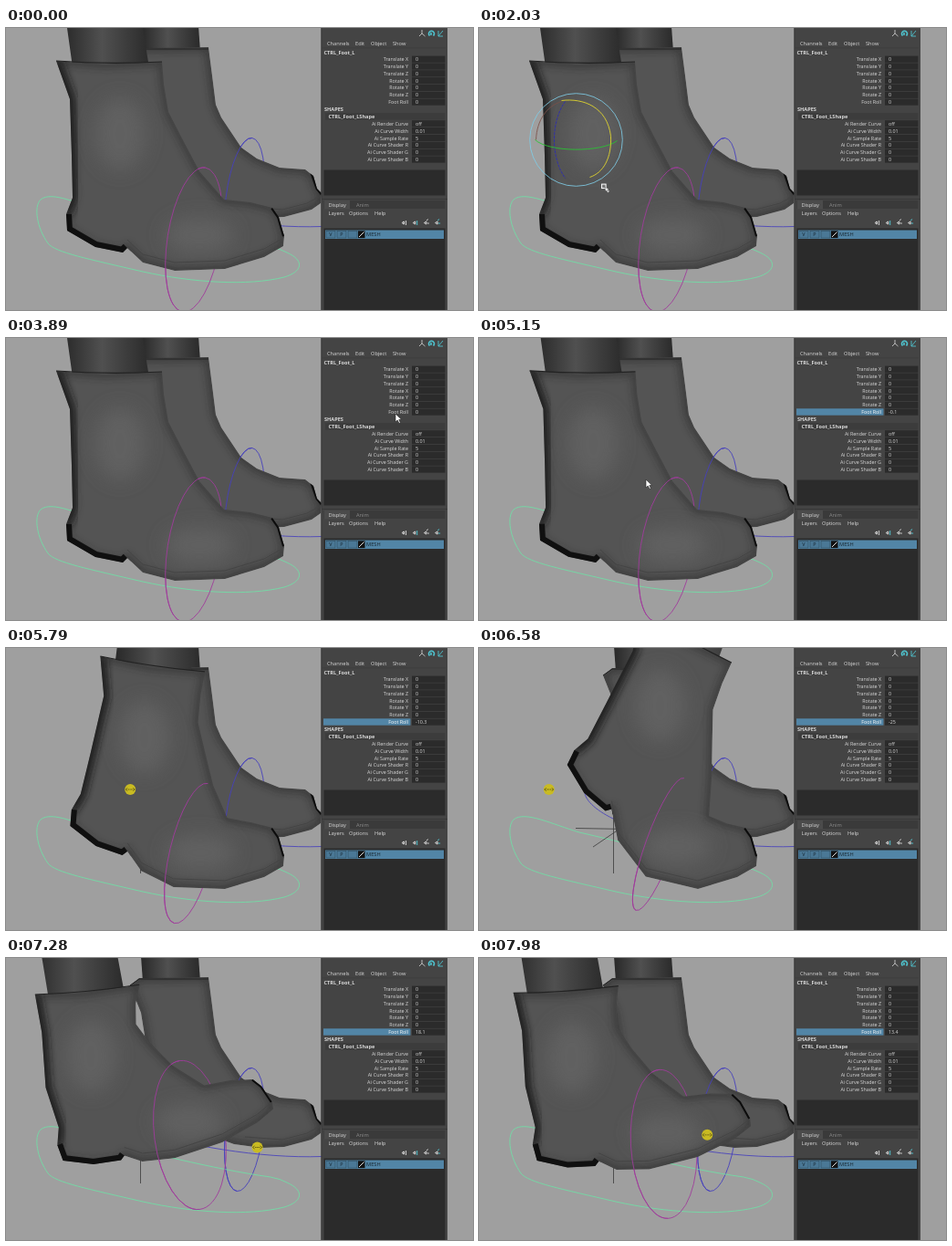
Animation, 512 px wide and 309 px high, one loop 8000 ms. Source, as an HTML page:

```html
<!DOCTYPE html>
<html lang="en">
<head>
<meta charset="utf-8">
<title>Foot roll rig</title>
<style>
  html, body { margin: 0; width: 100%; height: 100%; overflow: hidden; background: #9f9f9f; }
  svg { display: block; }
  text { font: 5.35px "Open Sans", "Noto Sans", sans-serif; fill: #dadada; }
  .bold { font-size: 5.6px; font-weight: 700; }
  .menu { font-size: 5.7px; }
  .end { text-anchor: end; }
  .line { fill: none; }
  .curve { fill: none; stroke-width: .85; }
</style>
</head>
<body>
<svg width="512" height="309" viewBox="0 0 512 309">
  <defs>
    <filter id="soft" x="-30%" y="-30%" width="160%" height="160%"><feGaussianBlur stdDeviation="4"/></filter>
    <filter id="glow" x="-60%" y="-60%" width="220%" height="220%"><feGaussianBlur stdDeviation="10"/></filter>
    <linearGradient id="leg"><stop stop-color="#282828"/><stop offset=".45" stop-color="#505050"/><stop offset="1" stop-color="#2a2a2a"/></linearGradient>
    <clipPath id="farClip"><path id="farClipPath"/></clipPath>
    <clipPath id="nearClip"><path id="nearClipPath"/></clipPath>
  </defs>
  <rect width="512" height="309" fill="#9f9f9f"/>

  <g class="curve" stroke="#4640bc">
    <path d="M150 143C104 142 106 167 147 187C190 205 280 220 346 217.500"/>
    <ellipse rx="20.500" ry="68" transform="translate(261.500 188) rotate(7)"/>
  </g>
  <path fill="url(#leg)" d="M148-2H211L213 26H150Z"/>
  <g clip-path="url(#farClip)">
    <path id="far" fill="#545454"/>
    <path id="farEdge" class="line" stroke="#222" stroke-width="8" opacity=".55" filter="url(#soft)"/>
    <path class="line" stroke="#0c0c0c" stroke-width="3" d="M335 159L341 176 346 182"/>
    <path class="line" stroke="#444" d="M345 184L330 192 303 199 262 196"/>
  </g>
  <path class="line" stroke="#222" d="M136 30L146 23H222"/>
  <path class="curve" stroke="#4640bc" transform="translate(261.500 188) rotate(7)" d="M0-68A20.500 68 0 0 0 0 68"/>

  <path class="curve" stroke="#70dfa6" d="M290 240C225 231 150 211 110 202C80 193 50 178 38 188C30 196 34 219 46 236C54 246 90 253 150 267C205 279 265 283 305 273C325 267 328 255 308 246Q301 242 290 240"/>
  <path class="line" stroke="#3a3a3a" stroke-width=".8" d="M106 197.500L190 199M147.500 150V247M125 218L175 184"/>
  <ellipse id="ring" class="curve" stroke="#a03c9c"/>
  <path id="shin" fill="url(#leg)"/>
  <g clip-path="url(#nearClip)">
    <path id="near" fill="#545454"/>
    <ellipse id="shaftLight" rx="28" ry="40" fill="#606060" filter="url(#glow)"/>
    <ellipse id="vampLight" rx="38" ry="20" fill="#606060" filter="url(#glow)"/>
    <path id="nearEdge" class="line" stroke="#222" stroke-width="8" opacity=".5" filter="url(#soft)"/>
    <path id="backShade" class="line" stroke="#1c1c1c" stroke-width="10" filter="url(#soft)"/>
    <path id="welt" class="line" stroke="#444"/>
    <path id="heel" class="line" stroke="#101010" stroke-width="12"/>
    <path id="toe" class="line" stroke="#0c0c0c" stroke-width="4"/>
  </g>
  <path id="rim" class="line" stroke="#222" stroke-width="1.200"/>
  <path id="ringFront" class="curve" stroke="#a03c9c"/>

  <g id="gizmo" class="curve" transform="translate(106.500 122.500)">
    <path stroke="#7b5148" d="M-44 0C-43-22-32-37-16-42"/>
    <path stroke="#2a2ab8" d="M-12-42C-28-20-28 20-12 42" stroke-dasharray="3 1"/>
    <path stroke="#27c832" d="M-45 0C-30 14 28 14 45 1"/>
    <path id="hotRing" d="M-16-43C8-46 34-36 38-4C39 20 30 36 15 41"/>
    <circle r="50.800" stroke="#7fcbe6"/>
  </g>

  <g id="panel"></g>

  <path id="arrow" fill="#fff" stroke="#222" stroke-width=".6" d="M0 0V9L2.200 7 4 10.500 5.400 9.800 3.800 6.500 6.500 6.300Z"/>
  <g id="pick">
    <path stroke="#fff" stroke-width="2" d="M4 4L8 9"/>
    <rect x=".5" y=".5" width="4.500" height="4.500" fill="#777" stroke="#fff"/>
    <path fill="#fff" stroke="#222" stroke-width=".4" d="M4 4L8.500 6 6.500 6.800 8.500 9 7.500 9.800 5.800 7.500 4.800 9Z"/>
  </g>
  <g id="drag">
    <circle r="6" fill="#c9bb22"/>
    <path class="line" stroke="#6a6214" d="M-3-1.500L-5 0-3 1.500M3-1.500L5 0 3 1.500M-2.500 0H-1M-.5 0H.5M1 0H2.500"/>
  </g>
</svg>
<script>
const LOOP = 8000, REFRESH = 78, PHASE = 18;
const $ = id => document.getElementById(id);
const set = (node, attrs) => { for (const k in attrs) node.setAttribute(k, attrs[k]); return node; };
const setAll = (ids, attrs) => ids.split(' ').forEach(id => set($(id), attrs));
const show = (node, on) => { node.style.display = on ? '' : 'none'; };
const clamp = (v, lo, hi) => Math.min(hi, Math.max(lo, v));
const mix = (a, b, k) => a.map((v, i) => v + (b[i] - v) * k);

// Channel box and layer editor
const DARK = '#2b2b2b', BLUE = '#5285a6', TEAL = '#4fc3cf';
const add = (tag, attrs, text) => {
  const node = set(document.createElementNS('http://www.w3.org/2000/svg', tag), attrs);
  if (text !== undefined) node.textContent = text;
  return $('panel').appendChild(node);
};
const box = (x, y, width, height, fill) => add('rect', { x, y, width, height, fill });
const label = (x, y, text, cls = '', fill = '') =>
  add('text', { x, y: y + 2, class: cls, style: fill && `fill:${fill}` }, text);
const stroke = (d, color, width = 1) => add('path', { d, fill: 'none', stroke: color, 'stroke-width': width });
function row(name, value, y) {
  box(445, y - 3.6, 36.5, 7.2, DARK);
  return { name: label(441, y, name, 'end'), value: label(449, y, value) };
}

box(345.5, 0, 138.5, 309, '#444');
box(345.5, 0, 1, 309, '#383838');
stroke('M456 2V6L453 9M456 6L459.500 9', '#bbb');
stroke('M464.500 8.500A3 3 0 1 1 468.500 8.500M466 5V8', TEAL, 1.6);
stroke('M474 9L479 3M474 3V9H479', TEAL, .9);
[['Channels', 352], ['Edit', 383], ['Object', 400], ['Show', 424]].forEach(([s, x]) => label(x, 16.5, s, 'menu'));
box(347, 21.5, 135, .7, '#3a3a3a');
label(348.5, 26.5, 'CTRL_Foot_L', 'bold');

const hilite = box(348, 77.3, 95.5, 7.4, BLUE);
['Translate', 'Rotate'].forEach((kind, k) => [...'XYZ'].forEach((axis, i) =>
  row(`${kind} ${axis}`, '0', 34.2 + (3 * k + i) * 7.82)));
const rollRow = row('Foot Roll', '0', 81.1);
label(349, 89, 'SHAPES', 'bold');
box(350, 93.2, 131.5, 7.4, '#3c3c3c');
label(353.5, 97, 'CTRL_Foot_LShape', 'bold');
[['Render Curve', 'off'], ['Curve Width', '0.01'], ['Sample Rate', '5'],
  ['Curve Shader R', '0'], ['Curve Shader G', '0'], ['Curve Shader B', '0']]
  .forEach(([name, value], i) => row('Ai ' + name, value, 104.8 + i * 7.85));

box(348.5, 155.5, 133, 28, DARK);
box(346, 187, 138, 1, '#383838');
box(348.5, 189, 133, 9, '#3a3a3a');
box(349, 189, 28, 9.5, '#4b4b4b');
label(353.5, 194, 'Display', 'menu');
label(384, 194, 'Anim', 'menu', '#8c8c8c');
[['Layers', 353.5], ['Options', 376], ['Help', 404]].forEach(([s, x]) => label(x, 203, s, 'menu'));
for (let i = 0; i < 4; i++) {
  const x = 436.5 + i * 12.2;
  stroke(`M${x - 2.5} 213.500L${x} 212V215Z`, '#ddd');
  stroke(i < 2 ? `M${x + 2} 211V216` : `M${x} 211L${x + 2} 209.500M${x + 1} 214H${x + 3}`, i % 2 ? TEAL : '#ccc');
}
box(348.5, 219.5, 133, 89.5, DARK);
box(350, 221.5, 130, 9.5, BLUE);
['V', 'P', ''].forEach((s, i) => {
  const x = 351 + 12 * i;
  set(box(x, 222.5, 10, 7.5, '#4a7896'), { stroke: '#2d4a5c', 'stroke-width': .6 });
  label(x + 3.2, 226.3, s, '', '#16232c');
});
box(386, 222.3, 7.5, 7.8, '#111');
stroke('M387 229L392.500 223.500', '#ddd');
label(395, 226.3, 'MESH', 'menu', '#17252e');

// Near boot at rest: outline clockwise from the back of the collar
const points = s => s.split(' ').map(p => p.split(',').map(Number));
const BOOT = points('55,36 110,40 171,37 173,62 178,92 194,123 212,157 239,188 268,191 292,197 299,207 305,228 ' +
  '304,239 283,251 240,264 185,266 150,257 133,241 128,246 98,240 67,222 66,204 73,186 72,140 70,78');
const SHIN = points('62,-60 144,-60 150,0 158,50 74,50 67,0');
const TOE_PIVOT = [265, 233], HEEL_PIVOT = [67, 222];

function turn([x, y], [cx, cy], deg) {
  const a = deg * Math.PI / 180, c = Math.cos(a), s = Math.sin(a);
  return [cx + (x - cx) * c - (y - cy) * s, cy + (x - cx) * s + (y - cy) * c];
}

// Negative roll lifts the heel about the toe; positive roll lifts the toe about the heel.
function bend([x, y], roll) {
  if (roll < 0) {
    const weight = clamp((290 - x - .9 * (y - 190)) / 100, 0, 1);
    const lean = .13 * Math.sin(-Math.PI * roll / 25) * Math.max(0, 190 - y);
    const [tx, ty] = mix([x, y], turn([x, y], TOE_PIVOT, -.5 * roll + .026 * roll * roll), weight);
    return [tx + lean, ty];
  }
  const weight = clamp((y + 10) / 140, .35, 1);
  const flat = [x, y - Math.max(0, y - 222) * .014 * roll];
  const [tx, ty] = mix(flat, turn(flat, HEEL_PIVOT, -.93 * roll), weight);
  return [tx - .25 * roll, ty];
}

const path = pts => 'M' + pts.map(p => p.map(v => v.toFixed(1)).join(' ')).join('L');

setAll('far farEdge farClipPath', {
  d: `M136 30L146 22 222 21 226 52 230 84 236 98 246 113 258 131 275 143 300 153 328 155 337 162 341 176 346 181
    345 192 335 199 305 207 280 208 250 204 225 195 170 190 156 110 148 60Z`
});

function drawBoot(roll) {
  const b = BOOT.map(p => bend(p, roll));
  const between = (i, j) => { const [cx, cy] = mix(b[i], b[j], .5); return { cx, cy }; };
  setAll('near nearEdge nearClipPath', { d: path(b) + 'Z' });
  set($('shin'), { d: path(SHIN.map(p => bend(p, roll))) + 'Z' });
  set($('shaftLight'), between(4, 23));
  set($('vampLight'), between(7, 15));
  set($('welt'), { d: path(b.slice(11, 18).map(([x, y]) => [x, y - 9])) });
  set($('heel'), { d: path(b.slice(17, 22)) });
  set($('toe'), { d: path(b.slice(9, 12)) });
  set($('backShade'), { d: path([...b.slice(21), b[0]]) });
  set($('rim'), { d: `M${b[0]}Q${b[1]} ${b[2]}` });
}

function drawRing(roll) {
  const up = Math.max(0, roll), down = Math.min(0, roll);
  const rx = 29 + .54 * roll, ry = 80 + .12 * roll;
  const transform = `translate(${206 - .25 * up + .3 * down} ${232 - 2.1 * up + .68 * down}) rotate(${9 - .92 * up - .44 * down})`;
  set($('ring'), { rx, ry, transform });
  set($('ringFront'), { d: `M0 ${-ry}A${rx} ${ry} 0 0 0 0 ${ry}`, transform });
}

// Key points: time, then values
const POINTER = [[70, 222, 297], [530, 106, 256], [1390, 101, 251], [1710, 102, 253], [1960, 134, 171],
  [2350, 138, 151], [2880, 404, 110], [3830, 427, 83], [4290, 427, 83], [5080, 183, 155]];
const ROLL = [[5080, 0], [5790, -10.3], [6110, -25], [6570, -25], [7272, 18.1], [7670, 25], [7830, 22], [7974, 13.4]];

function sample(keys, t) {
  const i = keys.findIndex(k => k[0] > t);
  if (i === 0) return keys[0].slice(1);
  if (i < 0) return keys[keys.length - 1].slice(1);
  const a = keys[i - 1], b = keys[i];
  return mix(a, b, (t - a[0]) / (b[0] - a[0])).slice(1);
}

function draw(t) {
  const [roll] = sample(ROLL, t);
  const dragging = t >= 5120, picking = t >= 1700 && t < 2880;
  const [x, y] = dragging
    ? [183 + 4.75 * roll + .02 * roll * roll, 155 + 2.9 * Math.max(0, roll)]
    : sample(POINTER, t);
  drawBoot(roll);
  drawRing(roll);
  rollRow.value.textContent = String(+roll.toFixed(1));
  rollRow.name.style.fill = t >= 4060 ? '#fff' : '';
  show(hilite, t >= 4060);
  show($('gizmo'), t >= 1700 && t < 3400);
  set($('hotRing'), { stroke: t >= 1960 && t < 2350 ? '#e8dc2c' : '#b8382e' });
  show($('drag'), dragging);
  show($('pick'), picking);
  show($('arrow'), t >= 70 && !dragging && !picking);
  setAll('drag pick arrow', { transform: `translate(${x} ${y})` });
}

const start = performance.now();
let last = -1;
function tick() {
  const now = (performance.now() - start) % LOOP;
  const t = Math.max(0, Math.floor((now - PHASE) / REFRESH) * REFRESH + PHASE);
  if (t !== last) draw(last = t);
  requestAnimationFrame(tick);
}
tick();
</script>
</body>
</html>
```
